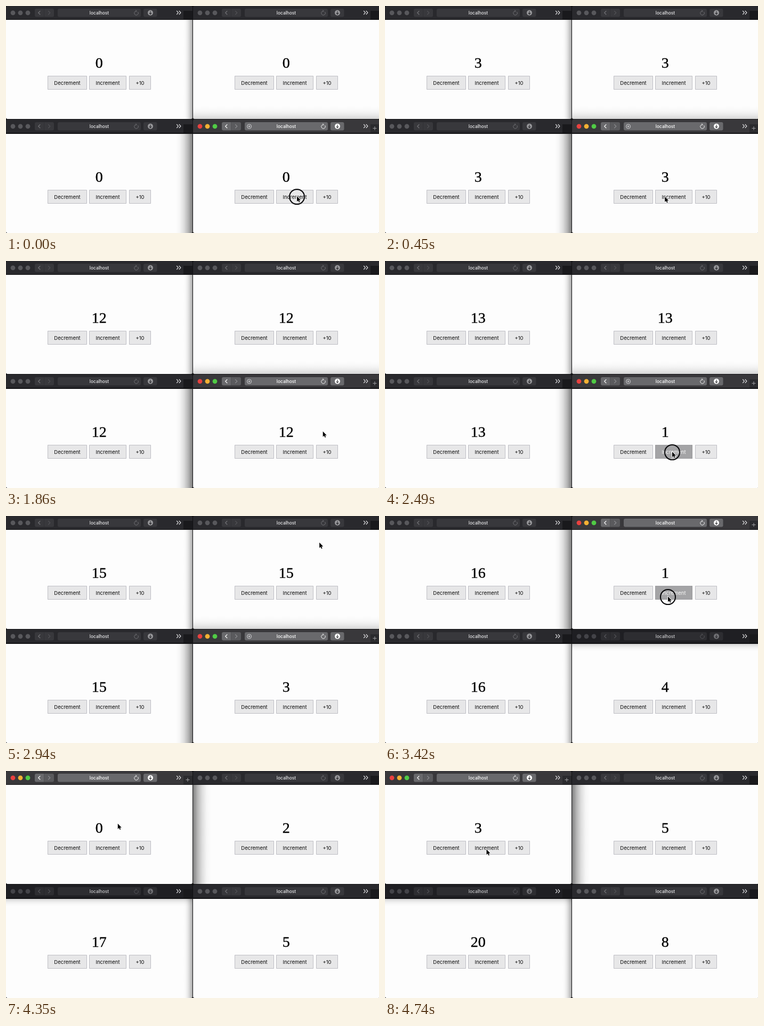
Recreate the animation shown at these times as an HTML page with a canvas. Size 700 px wide and 426 px high, loop 4.77 s.

```html
<!DOCTYPE html>
<html lang="en">
<head>
<meta charset="utf-8">
<title>Synced counters</title>
<style>
html, body { margin: 0; width: 100%; height: 100%; overflow: hidden; background: #101012; }
canvas { display: block; }
</style>
</head>
<body>
<canvas id="stage" width="700" height="426"></canvas>
<script>
const ctx = document.getElementById('stage').getContext('2d');
const LOOP = 4770;
const TL = 0, TR = 1, BL = 2, BR = 3;
const SANS = 'Inter, "Liberation Sans", sans-serif';
const SERIF = '"Liberation Serif", "Times New Roman", serif';

const BUTTONS = {
  dec: { label: 'Decrement', x: 78, w: 73, add: -1 },
  inc: { label: 'Increment', x: 156, w: 69, add: 1 },
  ten: { label: '+10', x: 231, w: 40, add: 10 }
};

// Each click: mouse-down time, window, target, pointer position
const CLICKS = [
  [0, BR, 'inc', 546, 357], [125, BR, 'inc', 546, 357], [250, BR, 'inc', 546, 357],
  [620, BR, 'dec', 480, 359], [740, BR, 'dec', 481, 359], [860, BR, 'dec', 481, 359],
  [1090, BR, 'inc', 545, 358], [1210, BR, 'inc', 545, 358],
  [1640, BR, 'ten', 595, 358], [2080, BR, 'reload', 594, 226],
  [2340, BR, 'inc', 539, 358], [2450, BR, 'inc', 539, 358], [2570, BR, 'inc', 539, 358],
  [3010, TR, 'reload', 594, 13],
  [3265, TR, 'inc', 531, 151], [3385, TR, 'inc', 531, 151],
  [3500, TR, 'inc', 531, 151], [3615, TR, 'inc', 531, 151],
  [3805, TR, 'dec', 448, 142], [3925, TR, 'dec', 448, 142],
  [4150, TL, 'reload', 244, 13],
  [4420, TL, 'inc', 190.5, 147], [4520, TL, 'inc', 190.5, 147], [4620, TL, 'inc', 190.5, 147]
].map(([at, win, target, x, y]) => ({ at, win, target, x, y }));

const HOLD = 100, PRESS_ON = 20, PRESS_OFF = 80;

// Shadows thrown on neighbours by the front window: window, edge, depth, strength
const SHADOWS = {
  [BR]: [[TL, 'right', 17, .34], [TR, 'bottom', 25, .16], [BL, 'right', 32, .5]],
  [TR]: [[TL, 'right', 32, .5], [BL, 'right', 17, .34], [BR, 'top', 15, .16]],
  [TL]: [[TR, 'left', 34, .5], [BL, 'top', 15, .16], [BL, 'right', 17, .34]]
};

function stateAt(t) {
  const counts = [0, 0, 0, 0];
  let active = BR, last = CLICKS[0], next = null;
  for (const click of CLICKS) {
    if (click.at > t) { next = click; break; }
    last = click;
    active = click.win;
    if (t < click.at + PRESS_OFF) continue;
    if (click.target === 'reload') counts[click.win] = 0;
    else for (let i = 0; i < 4; i++) counts[i] += BUTTONS[click.target].add;
  }
  const age = t - last.at;
  let { x, y } = last;
  if (next && age > HOLD) {
    const u = (age - HOLD) / (next.at - last.at - HOLD);
    const k = u * u * (3 - 2 * u);
    x += (next.x - x) * k;
    y += (next.y - y) * k;
  }
  const pressed = age >= PRESS_ON && age < PRESS_OFF ? last : null;
  return { counts, active, x, y, ring: age < HOLD, pressed };
}

function box(x, y, w, h, fill, radius = 0) {
  ctx.fillStyle = fill;
  ctx.beginPath();
  ctx.roundRect(x, y, w, h, radius);
  ctx.fill();
}

function disc(x, y, r, fill) {
  ctx.fillStyle = fill;
  ctx.beginPath();
  ctx.arc(x, y, r, 0, Math.PI * 2);
  ctx.fill();
}

function line(color, width, ...paths) {
  ctx.strokeStyle = color;
  ctx.lineWidth = width;
  ctx.beginPath();
  for (const [start, ...rest] of paths) {
    ctx.moveTo(...start);
    rest.forEach(p => ctx.lineTo(...p));
  }
  ctx.stroke();
}

function arc(x, y, r, color, width, from = 0, to = Math.PI * 2) {
  ctx.strokeStyle = color;
  ctx.lineWidth = width;
  ctx.beginPath();
  ctx.arc(x, y, r, from, to);
  ctx.stroke();
}

function text(str, x, y, font, color) {
  ctx.font = font;
  ctx.fillStyle = color;
  ctx.textAlign = 'center';
  ctx.fillText(str, x, y);
}

function chevron(x, y, dx, color) {
  line(color, 1.2, [[x - dx, y - 3.5], [x + dx, y], [x - dx, y + 3.5]]);
}

function toolbar(on, showAdd, shaded) {
  const control = on ? '#69696c' : shaded ? '#2d2d31' : '#38383c';
  const icon = on ? '#f4f4f4' : shaded ? '#55555a' : '#707074';
  box(0, 0, 350, 27, on ? '#39383b' : shaded ? '#1f1f23' : '#29292d');
  const lights = on ? ['#e9413f', '#f3b033', '#50cb45'] : Array(3).fill(shaded ? '#434348' : '#58585c');
  lights.forEach((color, i) => disc(13 + i * 14, 12.8, 4.4, color));

  box(54, 5, 17.5, 15.5, control, [3, 0, 0, 3]);
  box(72, 5, 18, 15.5, on ? '#5a5a5d' : control, [0, 3, 3, 0]);
  chevron(62.5, 12.8, -1.8, icon);
  chevron(81, 12.8, 1.8, on ? '#8a8a8d' : '#505054');

  box(97, 5, 156, 15.5, control, 3);
  text('localhost', 175, 16, '500 8.4px ' + SANS, on ? '#ffffff' : shaded ? '#cacacc' : '#e8e8ea');
  if (showAdd) {
    arc(105.5, 13, 4, '#dddddf', .9);
    line('#dddddf', .9, [[103.5, 13], [107.5, 13]], [[105.5, 11], [105.5, 15]]);
  }
  arc(244.5, 13.3, 3.8, icon, 1, -.6, 4.5);
  line(icon, 1, [[243.2, 7.8], [245.5, 9.5], [243.2, 11.2]]);

  box(258, 5, 25.5, 15.5, control, 3);
  disc(271, 12.8, 5, on ? '#ffffff' : shaded ? '#717175' : '#98989b');
  line(on ? '#464649' : '#303034', 1.2, [[271, 9.8], [271, 15.4]], [[268.8, 13.2], [271, 15.5], [273.2, 13.2]]);

  chevron(321.8, 12.5, 1.6, '#d8d8da');
  chevron(326.3, 12.5, 1.6, '#d8d8da');
  box(333, 9, 17, 18, on ? '#2b2b2e' : '#19191c');
  if (on) line('#a0a0a3', 1, [[337.5, 16.5], [344.5, 16.5]], [[341, 13], [341, 20]]);
  box(0, 25, 350, 2, '#111113');
}

function shadow(edge, depth, strength) {
  const W = 350, top = 26, bottom = 212;
  const horizontal = edge === 'left' || edge === 'right';
  const from = { left: 0, right: W, top, bottom }[edge];
  const to = edge === 'left' || edge === 'top' ? from + depth : from - depth;
  const g = horizontal ? ctx.createLinearGradient(from, 0, to, 0) : ctx.createLinearGradient(0, from, 0, to);
  for (let u = 0; u <= 1; u += .25) g.addColorStop(u, `rgba(0,0,0,${strength * (1 - u) ** 2})`);
  ctx.fillStyle = g;
  if (horizontal) ctx.fillRect(Math.min(from, to), top, depth, bottom - top);
  else ctx.fillRect(0, Math.min(from, to), W, depth);
}

function page(count, pressedTarget) {
  text(count, 174.8, 116, '28px ' + SERIF, '#000');
  ctx.strokeStyle = '#000';
  ctx.lineWidth = .4;
  ctx.strokeText(count, 174.8, 116);
  for (const [key, b] of Object.entries(BUTTONS)) {
    const down = key === pressedTarget;
    box(b.x, 131, b.w + 1, 26, down ? '#a4a4a6' : '#e7e7e8');
    ctx.strokeStyle = down ? '#9c9c9f' : '#bebec4';
    ctx.lineWidth = 1;
    ctx.strokeRect(b.x + .5, 131.5, b.w, 25);
    text(b.label, b.x + b.w / 2 + .5, 147.5, '9.5px ' + SANS, down ? '#f8f8f8' : '#0a0a0a');
  }
}

function drawWindow(i, s) {
  const lower = i >= 2;
  const shades = SHADOWS[s.active].filter(([win]) => win === i);
  ctx.save();
  ctx.translate(i % 2 * 351, lower ? 213 : 0);
  ctx.beginPath();
  ctx.roundRect(0, 0, 350, lower ? 213 : 212, 3);
  ctx.clip();
  toolbar(i === s.active, i === BR && i === s.active, shades.some(([, edge]) => edge === 'top'));
  if (lower) ctx.translate(0, 1);
  box(0, 26, 350, 186, '#fdfdfd');
  shades.forEach(([, edge, depth, strength]) => shadow(edge, depth, strength));
  page(s.counts[i], s.pressed && s.pressed.win === i ? s.pressed.target : null);
  ctx.restore();
}

function pointer({ x, y, ring }) {
  if (ring) arc(x, y + 1, 14, '#08080a', 2.1);
  const shape = [[0, 0], [0, 10.2], [2.3, 8.1], [3.9, 11.6], [5.5, 10.9], [4, 7.5], [7.1, 7.5]];
  ctx.beginPath();
  shape.forEach(([px, py]) => ctx.lineTo(x + px, y + py));
  ctx.closePath();
  ctx.lineJoin = 'round';
  ctx.strokeStyle = '#fff';
  ctx.lineWidth = 1.8;
  ctx.stroke();
  ctx.fillStyle = '#000';
  ctx.fill();
}

function draw(t) {
  const s = stateAt(t);
  box(0, 0, 700, 426, '#101012');
  for (let i = 0; i < 4; i++) drawWindow(i, s);
  pointer(s);
}

const start = performance.now();
function tick() {
  draw((performance.now() - start) % LOOP);
  requestAnimationFrame(tick);
}
tick();
</script>
</body>
</html>
```
